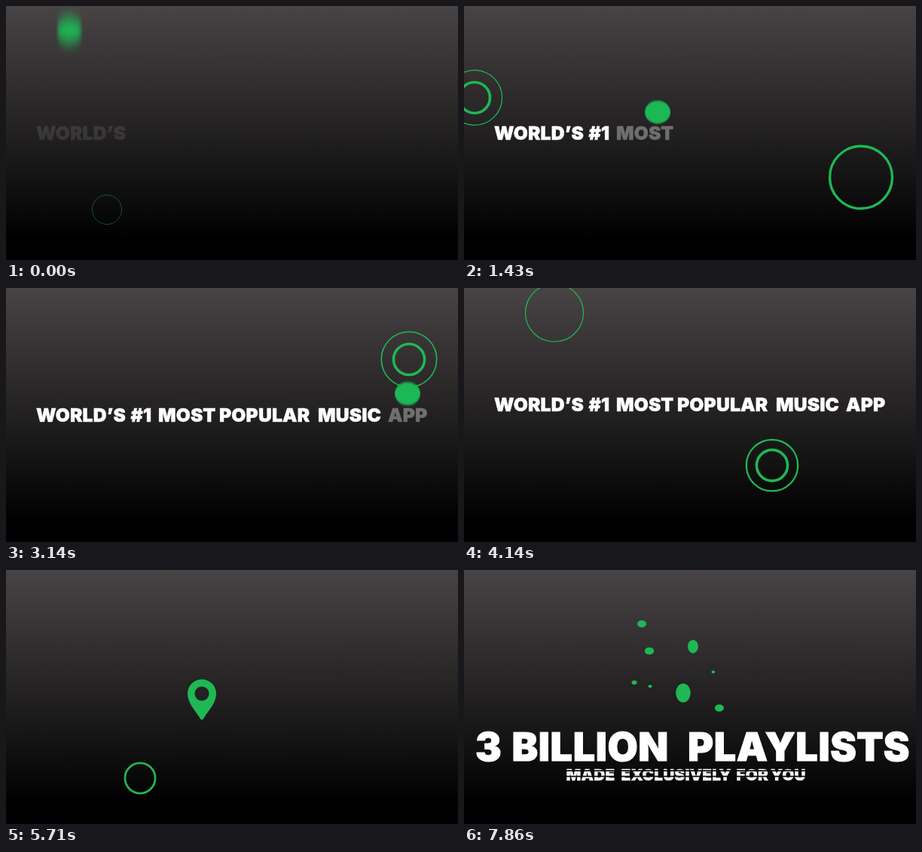
Animation of 600x338 px, one loop 8000 ms. Source, as an HTML page:

```html
<!DOCTYPE html>
<html lang="en">
<head>
<meta charset="utf-8">
<title>Music app promo</title>
<style>
html, body { margin: 0; width: 100%; height: 100%; overflow: hidden; background: #000; }
svg { display: block; width: 100vw; height: 100vh; }
text { font-family: Inter, "Open Sans", sans-serif; font-weight: 900; fill: #fff; stroke: #fff; stroke-width: .02em; }
#line { letter-spacing: .008em; }
#city { letter-spacing: .043em; }
#big, #small { letter-spacing: .012em; }
</style>
</head>
<body>
<svg id="stage" viewBox="0 0 600 338" preserveAspectRatio="none">
  <defs>
    <linearGradient id="sky" x1="0" y1="0" x2="0" y2="1">
      <stop offset="0" stop-color="#484344"/>
      <stop offset=".3" stop-color="#322e2f"/>
      <stop offset=".6" stop-color="#1a1919"/>
      <stop offset=".92" stop-color="#000"/>
    </linearGradient>
    <filter id="blur" filterUnits="userSpaceOnUse" x="-60" y="-80" width="740" height="500">
      <feGaussianBlur id="smear" stdDeviation="0"/>
    </filter>
    <clipPath id="blindsA"><path/></clipPath>
    <clipPath id="blindsB"><path/></clipPath>
  </defs>
  <rect width="600" height="338" fill="url(#sky)"/>
  <g id="rings" fill="none" stroke="#1eb854"></g>
  <g id="line" font-size="24.6"></g>
  <g id="city" font-size="62">
    <text x="69" y="191">NOW</text>
    <text x="270.5" y="191">N</text>
    <text x="336" y="191">INDIA</text>
  </g>
  <path id="pin" fill="#1eb854" fill-rule="evenodd"
    d="M-2 34.5C-7 25-19.5 14-19.5 0A19.5 19.5 0 0 1 19.5 0C19.5 14 7 25 2 34.5Q0 36.5-2 34.5ZM-9.8 0A9.8 9.8 0 0 0 9.8 0A9.8 9.8 0 0 0-9.8 0Z"/>
  <ellipse id="ball" fill="#1eb854" filter="url(#blur)"/>
  <ellipse id="drop" fill="#1eb854"/>
  <g id="dots" fill="#1eb854"></g>
  <g id="big" font-size="52" clip-path="url(#blindsA)">
    <text x="15" y="254">3</text>
    <text x="63.5" y="254">BILLION</text>
    <text x="297" y="254">PLAYLISTS</text>
  </g>
  <g id="small" font-size="20.7" clip-path="url(#blindsB)">
    <text x="135.5" y="280">MADE</text>
    <text x="208.5" y="280">EXCLUSIVELY</text>
    <text x="361.5" y="280">FOR</text>
    <text x="407" y="280">YOU</text>
  </g>
</svg>
<script>
const LOOP = 8000, FPS = 7, BEAT = 570, FIRST = 290, RING_LIFE = 950;
const $ = id => document.getElementById(id);
const clamp = v => Math.min(1, Math.max(0, v));
const span = (t, a, b) => clamp((t - a) / (b - a));
const mix = (a, b, p) => a + (b - a) * p;
const smooth = p => p * p * (3 - 2 * p);
const easeOut = p => 1 - (1 - p) ** 3;

function add(parent, tag, attrs = {}) {
  const el = document.createElementNS("http://www.w3.org/2000/svg", tag);
  set(el, attrs);
  return parent.appendChild(el);
}
function set(el, attrs) {
  for (const k in attrs) el.setAttribute(k, attrs[k]);
}
function show(el, on) {
  el.style.display = on ? "" : "none";
}

// word, left edge, where the ball lands
const words = [
  ["WORLD’S", 40, 99], ["#1", 165.5, 180], ["MOST", 202, 257],
  ["POPULAR", 283, 345], ["MUSIC", 414, 437], ["APP", 507, 533]
].map(([label, x, hit], i) => {
  const el = add($("line"), "text", { x, y: 178 });
  el.textContent = label;
  return { el, hit, at: FIRST + i * BEAT };
});

// x, y, outer radius, start time
const rings = [
  [134, 271, 40, -30], [527, 228, 41.5, 640], [14, 122, 40, 1050],
  [324, 24, 40.4, 1700], [365, 254, 40, 2195], [535, 95, 40, 2750],
  [120, 33, 38.5, 3285], [409, 236, 37, 3730], [105, 293, 36.5, 4278],
  [178, 277, 36, 5500]
].map(([cx, cy, r, start]) => ({
  r, start,
  inner: add($("rings"), "circle", { cx, cy }),
  outer: add($("rings"), "circle", { cx, cy })
}));

// burst position, later position, radius
const dots = [
  [248, 32, 236, 72, 5.4], [245, 70, 226, 150, 3.1], [254, 75, 246, 108, 5.5],
  [254, 93, 247, 155, 2.3], [273, 66, 291, 164, 11.2], [276, 83, 304, 102, 7.9],
  [291, 70, 331, 136, 2.1], [289, 103, 339, 184, 5.4]
].map(d => ({ d, el: add($("dots"), "ellipse") }));

function ballAt(t) {
  if (t < FIRST) {
    return [mix(70, 99, smooth(span(t, FIRST - BEAT, FIRST))), mix(32, 142, t / FIRST)];
  }
  const i = Math.min(words.length - 1, Math.floor((t - FIRST) / BEAT));
  const p = (t - words[i].at) / BEAT;
  const next = words[i + 1];
  const x = next ? mix(words[i].hit, next.hit, smooth(p)) : mix(words[i].hit, 645, p * p);
  return [x, 142 - 288 * p * (1 - p)];
}

function drawBall(t) {
  show($("ball"), t < 3720);
  const [x, y] = ballAt(t), a = ballAt(t - 20), b = ballAt(t + 20);
  const vx = Math.abs(b[0] - a[0]) / 40, vy = Math.abs(b[1] - a[1]) / 40;
  const squash = clamp((y - 130) / 12);
  set($("ball"), { cx: x, cy: y, rx: 16.5 + squash * .5, ry: 16.5 - squash * 1.3 });
  $("smear").setAttribute("stdDeviation", `${(vx * 18).toFixed(2)} ${(vy * 25).toFixed(2)}`);
}

function drawRings(t) {
  for (const { r, start, inner, outer } of rings) {
    const u = (t - start) / RING_LIFE, live = u > 0 && u < 1;
    show(inner, live && u < .82);
    show(outer, live && u > .3);
    if (!live) continue;
    set(inner, { r: 19.5 + u * 2.5, "stroke-width": Math.max(0, 3.6 * Math.sin(Math.PI * u / .82)) });
    const w = 7 * Math.sin(Math.PI * Math.max(0, u - .3) / .7) ** 2;
    set(outer, { r: r * (.8 + .2 * Math.min(1, u / .7)), "stroke-width": w });
  }
}

function drawLine(t) {
  show($("line"), t < 4420);
  for (const { el, at } of words) {
    const p = (t - at) / BEAT;
    el.setAttribute("opacity", clamp(.35 + .43 * p + .22 * p ** 3));
  }
  const lift = -14 * smooth(span(t, 3560, 4000));
  set($("line"), { transform: `translate(0 ${lift})`, opacity: 1 - span(t, 4200, 4420) });
}

function drawCity(t) {
  show($("city"), t > 4420 && t < 5700);
  const out = span(t, 5280, 5700) ** 2;
  set($("city"), { transform: `translate(${-540 * out} 0)`, opacity: span(t, 4300, 4700) });
  show($("pin"), t > 4420 && t < 5990);
  const drop = easeOut(span(t, 4400, 4700)), size = 1 - .5 * span(t, 5700, 5990);
  set($("pin"), { transform: `translate(260 ${mix(-30, 164.5, drop)}) scale(${size})` });
}

function drawBurst(t) {
  const rise = easeOut(span(t, 5990, 6420)), pull = 1 - rise;
  show($("drop"), t >= 5990 && t < 6500);
  set($("drop"), { cx: mix(260, 268, rise), cy: mix(164, 68, rise), rx: 13 - 2 * pull, ry: 13 + 4 * pull });
  show($("dots"), t >= 6500);
  const open = easeOut(span(t, 6400, 6710)), fall = span(t, 6710, 7860);
  for (const { d: [x, y, x2, y2, r], el } of dots) {
    // big drops wobble at twice the pace of small ones
    const wobble = .12 * Math.cos((t - 6710) / (r > 7 ? 183 : 366));
    set(el, {
      cx: mix(mix(268, x, open), x2, fall),
      cy: mix(mix(68, y, open), y2, fall) - 18 * Math.sin(Math.PI * fall),
      rx: r * (1 - wobble), ry: r * (1 + wobble)
    });
  }
}

function blinds(id, top, rows, step, p) {
  let d = "";
  for (let i = 0; i < rows; i++) d += `M0 ${top + i * step}h600v${step * p}h-600z`;
  $(id).firstElementChild.setAttribute("d", d);
}

function drawTitles(t) {
  show($("big"), t > 6990);
  show($("small"), t > 7400);
  blinds("blindsA", 212, 6, 8, span(t, 6900, 7420));
  blinds("blindsB", 260.5, 4, 7.5, span(t, 7280, 8040));
}

function draw(t) {
  drawRings(t);
  drawLine(t);
  drawBall(t);
  drawCity(t);
  drawBurst(t);
  drawTitles(t);
}

const begin = performance.now();
function tick() {
  const t = (performance.now() - begin) % LOOP;
  // the picture advances in seven steps a second
  draw(Math.floor((t + 6) * FPS / 1000) % (LOOP * FPS / 1000) * 1000 / FPS);
  requestAnimationFrame(tick);
}
draw(0);
requestAnimationFrame(tick);
</script>
</body>
</html>
```
